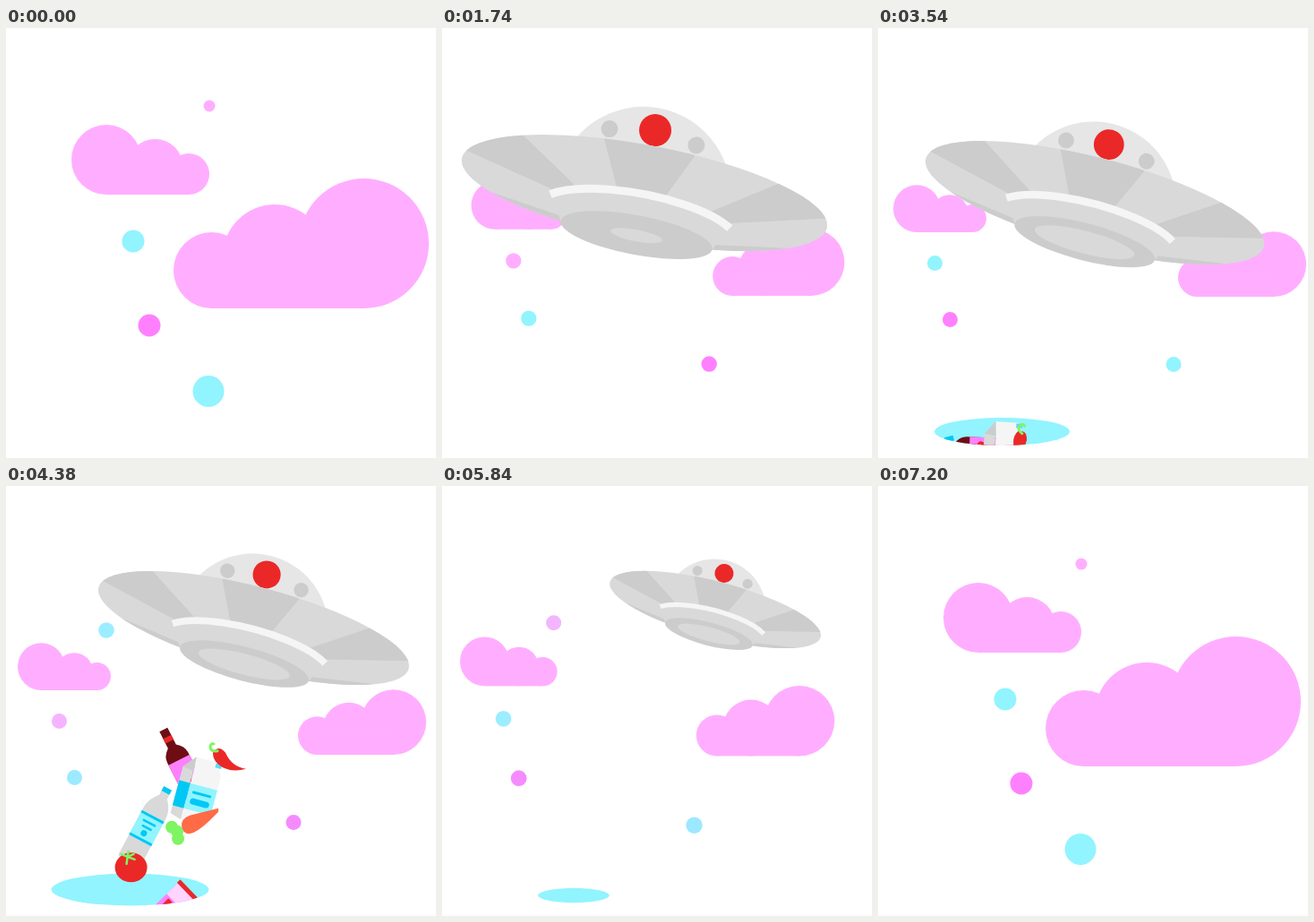
These frames come from a looping animation (480 px wide and 480 px high, 7.22 s). An HTML page with a canvas:

```html
<!DOCTYPE html>
<html>
<head>
<meta charset="utf-8">
<style>
html, body { margin: 0; width: 100%; height: 100%; overflow: hidden; background: #fff; }
canvas { display: block; }
</style>
</head>
<body>
<canvas id="stage" width="480" height="480"></canvas>
<script>
const g = document.getElementById('stage').getContext('2d');
const LOOP = 7220, TAU = Math.PI * 2;
const CYAN = '#91f4ff', BLUE = '#00c8f5', PINK = '#ff80ff', ROSE = '#ffaeff', RED = '#eb2828',
  GREEN = '#7ef562', WINE = '#6e0e14', LIGHT = '#d9d9d9', DARK = '#cccccc', PALE = '#f5f5f5';

const lerp = (a, b, u) => a + (b - a) * u;

// Smooth monotone interpolation of key points [time, ...values]
function track(keys, t) {
  const last = keys.length - 1;
  if (t <= keys[0][0]) return keys[0].slice(1);
  if (t >= keys[last][0]) return keys[last].slice(1);
  const i = keys.findIndex(k => k[0] > t) - 1;
  const a = keys[i], b = keys[i + 1], h = b[0] - a[0], u = (t - a[0]) / h, w = 1 - u;
  const secant = (n, c) => (keys[n + 1][c] - keys[n][c]) / (keys[n + 1][0] - keys[n][0]);
  const slope = (n, c) => {
    if (n === 0 || n === last) return 0;
    const p = secant(n - 1, c), q = secant(n, c);
    return p * q > 0 ? 2 * p * q / (p + q) : 0;
  };
  return a.slice(1).map((v, j) => {
    const c = j + 1;
    return v * w * w * (1 + 2 * u) + b[c] * u * u * (3 - 2 * u)
      + h * u * w * (slope(i, c) * w - slope(i + 1, c) * u);
  });
}

function oval(x, y, rx, ry, color) {
  g.fillStyle = color;
  g.beginPath();
  g.ellipse(x, y, rx, ry, 0, 0, TAU);
  g.fill();
}
const disc = (x, y, r, color) => oval(x, y, r, r, color);
function box(x, y, w, h, color) { g.fillStyle = color; g.fillRect(x, y, w, h); }
function shape(d, color) { g.fillStyle = color; g.fill(new Path2D(d)); }
function line(d, color, width) {
  g.strokeStyle = color;
  g.lineWidth = width;
  g.lineCap = 'round';
  g.stroke(new Path2D(d));
}
function at(x, y, scale, deg, draw) {
  g.save();
  g.translate(x, y);
  g.rotate(deg * Math.PI / 180);
  g.scale(scale, scale);
  draw();
  g.restore();
}

// Camera: zooms out and back, lifts briefly, and pans the two depth layers
const zoomAt = t => track([[0, 0], [860, .71], [1740, .96], [2700, 1], [4380, 1], [5840, .89], [LOOP, 0]], t)[0];
const liftAt = t => track([[0, 0], [860, -8.5], [1740, -1.6], [2700, 0]], t)[0];
const panAt = {
  left: t => track([[0, 0], [860, 13], [1740, 17], [2960, 17], [3540, 4], [4380, 0]], t)[0],
  right: t => track([[0, 0], [860, 0], [1740, -19], [2960, -23], [3540, 9], [4380, 0], [5840, -29], [LOOP, 0]], t)[0]
};

// near and far: [x, y, size] before and after zooming out
const clouds = [
  { layer: 'left', near: [150, 186, 1], far: [65, 228, .675], puffs: [[-38, 39], [16.5, 31], [54, 23]] },
  { layer: 'right', near: [329.5, 313, 1], far: [397.5, 300, .502], puffs: [[-100, 42.5], [-29.5, 58], [70, 72.5]] }
];
const dots = [
  { layer: 'left', near: [227, 87, 6.5], far: [112, 161, 8.8], colors: [ROSE, CYAN] },
  { layer: 'left', near: [142, 238, 12.5], far: [59.5, 262.5, 8.5], colors: [CYAN, ROSE] },
  { layer: 'left', near: [160, 332, 12.5], far: [76.5, 325.5, 8.5], colors: [PINK, CYAN] },
  { layer: 'right', near: [226, 405.5, 17.5], far: [321, 375.5, 8.5], colors: [CYAN, PINK] }
];

function place({ layer, near, far }, t) {
  const z = zoomAt(t);
  return [lerp(near[0], far[0], z) + panAt[layer](t), lerp(near[1], far[1], z) + liftAt(t),
    near[2] * (far[2] / near[2]) ** z];
}

function mix([a, b], u) {
  const part = (s, i) => parseInt(s.slice(i, i + 2), 16);
  return `rgb(${[1, 3, 5].map(i => Math.round(lerp(part(a, i), part(b, i), u)))})`;
}

function drawBackground(t) {
  for (const cloud of clouds) {
    const [x, y, size] = place(cloud, t), [first, , last] = cloud.puffs;
    const h = Math.min(first[1], last[1]);
    at(x, y, size, 0, () => {
      cloud.puffs.forEach(([cx, r]) => disc(cx, -r, r, ROSE));
      box(first[0], -h, last[0] - first[0], h, ROSE);
    });
  }
  const wave = .5 - .5 * Math.cos(TAU * 6 * t / LOOP);
  const blend = wave * wave * (3 - 2 * wave);
  for (const dot of dots) disc(...place(dot, t), mix(dot.colors, blend));
}

// Ship flight: [time, x, y, scale]
const flight = [[220, 300, 90, 0], [860, 227, 63, .61], [1740, 226, 184, 1], [2600, 204, 212, 1.02],
  [3540, 242, 195, .94], [4380, 276.5, 158.5, .863], [5200, 280, 157, .855], [5840, 305, 138, .587], [6500, 366, 86, 0]];
const tiltAt = t => 14.7 - 24 * Math.exp((860 - Math.max(t, 860)) / 490);

function band() {
  g.beginPath();
  g.ellipse(-1, 35, 112, 33.5, 0, Math.PI * 1.136, Math.PI * 1.864);
}

function drawShip(t) {
  const [x, y, scale] = track(flight, t);
  if (scale <= 0) return;
  const [hatch] = track([[860, 21], [1740, 29.5], [2400, 61]], t);
  at(x, y, scale, tiltAt(t), () => {
    g.fillStyle = '#e6e6e6';
    g.beginPath();
    g.arc(-1, 2, 98, Math.PI, TAU);
    g.fill();
    disc(-51.6, -63, 9.5, DARK);
    disc(47, -63, 9.5, DARK);
    disc(-1.2, -71, 18, RED);

    oval(0, 0, 207.4, 53.2, LIGHT);
    g.save();
    g.clip();
    shape('M-4 58L-55-50V-60H47V-50Z', DARK);
    for (const side of [-1, 1]) {
      g.save();
      g.scale(side, 1);
      shape('M0 40L210-11V-60L145-38L0 57Z M0 55L168 31L140 60Z', DARK);
      g.restore();
    }
    g.restore();

    band();
    g.lineTo(86, 48);
    g.lineTo(-86, 48);
    g.fillStyle = LIGHT;
    g.fill();
    band();
    g.strokeStyle = PALE;
    g.lineWidth = 9;
    g.lineCap = 'butt';
    g.stroke();

    oval(0, 48, 86, 22, DARK);
    oval(0, 48.5, hatch, hatch * .22, LIGHT);
  });
}

// Groceries, each drawn around its own centre
function wine() {
  shape('M-5-47H5V-26Q13-20 13-12V47H-13V-12Q-13-20-5-26Z', WINE);
  box(-5, -38, 10, 6, RED);
  box(-13, -9, 26, 37, PINK);
  disc(4, 4, 4.5, RED);
  box(-8, 16, 16, 3, RED);
}
function carton() {
  shape('M-22-22L-10-36L-9 36L-22 32Z', LIGHT);
  shape('M-10-36H16L22-20V36H-9V-20Z', PALE);
  shape('M-22-22L-10-36L-9-20Z', DARK);
  box(-22, -6, 13, 29, BLUE);
  box(-9, -6, 31, 29, CYAN);
  line('M-3 3H16', BLUE, 3);
  line('M-1 13H14', BLUE, 7);
  box(13, -35, 7, 5, '#5adcf8');
}
function chili() {
  shape('M-17-8Q-10-16-3-7Q4 9 20 11Q6 15-5 10Q-18 3-17-8Z', RED);
  line('M-12-9Q-19-8-20-13Q-20-18-16-17', GREEN, 3);
}
function water() {
  box(-5, -47, 10, 6, BLUE);
  shape('M-5-41H5V-36Q14-26 14-16V43Q14 46 10 46H-10Q-14 46-14 43V-16Q-14-26-5-36Z', LIGHT);
  box(-14, -12, 28, 31, CYAN);
  box(-14, -12, 28, 3, BLUE);
  box(-14, 16, 28, 3, BLUE);
  line('M-7-3H7M-5 3H5', BLUE, 2.5);
  disc(0, 10, 3.5, BLUE);
}
function carrot() {
  [[-28, 6], [-21, 19], [-22, 11]].forEach(([x, y]) => disc(x, y, 7, GREEN));
  shape('M24-15L-8-7Q-18-3-17 5Q-15 15-7 13Q2 12 24-11Z', '#ff6b47');
}
function tomato() {
  oval(0, 0, 18, 16.5, RED);
  line('M-4-12L-11-15M-4-12L3-15M-4-12L-3-18M-4-12L4-9M-4-12L-5-4', GREEN, 2.5);
}
function jar() {
  box(-13, -23, 26, 48, PINK);
  box(-13, -23, 26, 17, '#ffd5ff');
  box(-14, -28, 28, 5, RED);
  box(-8, -4, 6, 14, RED);
  box(3, -4, 6, 14, RED);
}

// Pose halfway through the rise: [draw, x, y, turn, spin]
const items = [[wine, 197, 314, -27, 75], [carton, 213, 340, 15, 15], [chili, 248, 305, 0, -55],
  [water, 158.5, 379, 28, 45], [carrot, 213, 375, 0, 60], [tomato, 139.5, 426, 0, 40], [jar, 184, 469, 46, -25]];

// Higher items left the portal earlier and reach the hatch sooner
function drawItem([draw, x, y, turn, spin], t) {
  const depth = 505 - y, start = 3100 + 8 * Math.max(0, y - 340), end = 4900 + 3.5 * (y - 300);
  if (t < start || t >= end) return;
  const [ix, iy, angle, scale] = track([
    [start, x - .55 * depth, 505, turn - spin, 1],
    [4380, x, y, turn, 1],
    [end, 267, 199, turn + spin / 2, 0]
  ], t);
  at(ix, iy, scale, angle, draw);
}

function drawPortal(t) {
  const u = (t - 2100) / 4400;
  if (u <= 0 || u >= 1) return;
  const near = 1 - zoomAt(t), rx = 88 * Math.sin(Math.PI * u), ry = rx * .204;
  const x = 138.5 + 77 * near, y = 450.5 + 59 * near;
  oval(x, y, rx, ry, CYAN);
  g.save();
  g.beginPath();
  g.rect(0, 0, 480, y);
  g.ellipse(x, y, rx, ry, 0, 0, Math.PI);
  g.clip();
  items.forEach(item => drawItem(item, t));
  g.restore();
}

function frame(now) {
  const t = now % LOOP;
  box(0, 0, 480, 480, '#fff');
  drawBackground(t);
  drawShip(t);
  drawPortal(t);
  requestAnimationFrame(frame);
}
requestAnimationFrame(frame);
</script>
</body>
</html>
```
